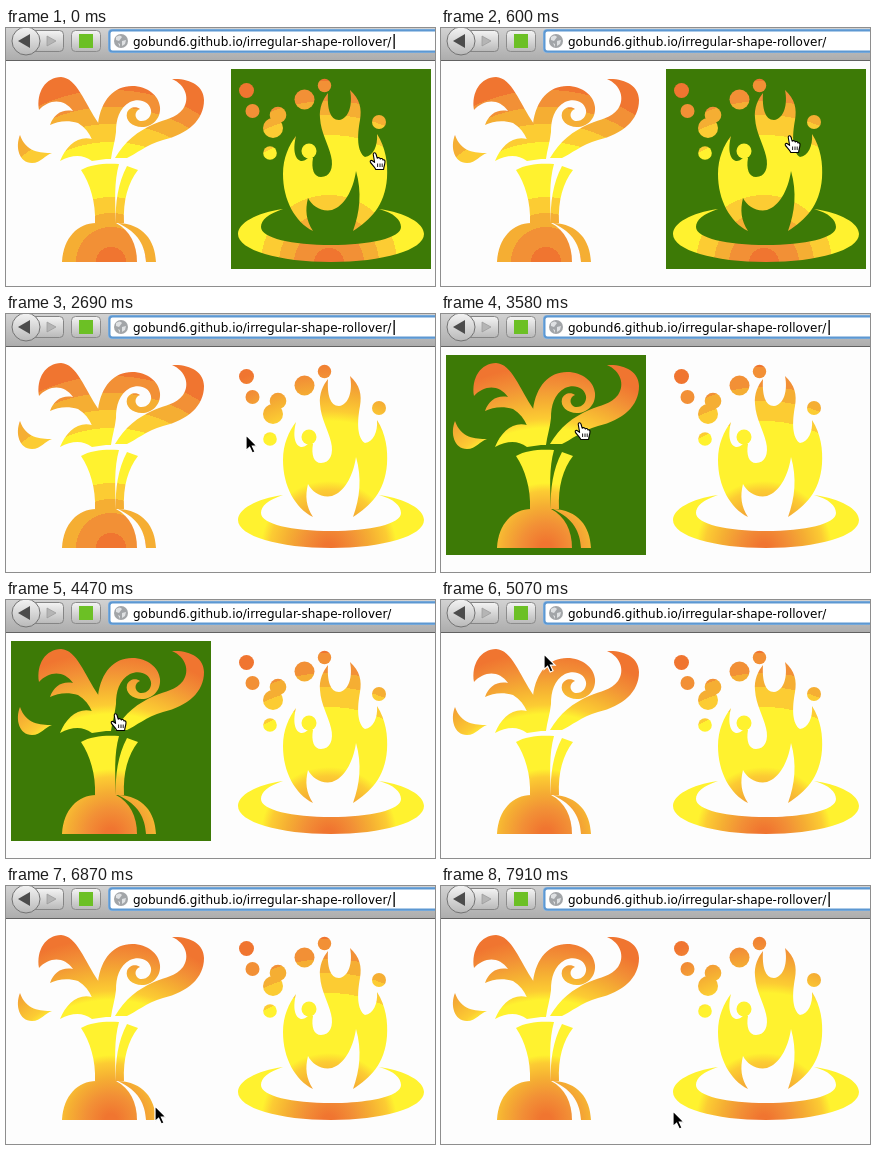
An HTML page for the animation above (8 s loop, 429x258 px).

```html
<!DOCTYPE html>
<html lang="en">
<head>
<meta charset="utf-8">
<title>Irregular shape rollover</title>
<style>
html, body { margin: 0; width: 100%; height: 100%; overflow: hidden; background: #fdfdfd; }
svg { display: block; width: 429px; height: 258px; }
text { font: 12px "DejaVu Sans", "Open Sans", sans-serif; }
</style>
</head>
<body>
<svg viewBox="0 0 429 258">
  <defs id="defs">
    <linearGradient id="bar" x2="0" y2="1"><stop stop-color="#d2d2d2"/><stop offset="1" stop-color="#adadad"/></linearGradient>
    <linearGradient id="button" x2="0" y2="1"><stop stop-color="#f4f4f4"/><stop offset="1" stop-color="#b9b9b9"/></linearGradient>
  </defs>

  <rect width="429" height="258" fill="#fdfdfd"/>
  <g id="toolbar">
    <rect width="429" height="32" fill="url(#bar)"/>
    <rect y="32" width="429" height="1" fill="#626262"/>
    <rect x="20.5" y="2.5" width="37" height="21" rx="4" fill="url(#button)" stroke="#858585"/>
    <path d="M41 8L50 13L41 18Z" fill="#b5b5b5" stroke="#999" stroke-width=".7"/>
    <circle cx="20" cy="13" r="14" fill="url(#button)" stroke="#737373"/>
    <path d="M12 13L24 6V20Z" fill="#4c4c4c"/>
    <rect x="65.5" y="2.5" width="29" height="21" rx="4" fill="url(#button)" stroke="#8c8c8c"/>
    <rect x="73" y="6" width="14" height="14" fill="#6cc025"/>
    <rect x="102" y="1" width="340" height="24" rx="4" fill="#8db9e4"/>
    <rect x="103.5" y="2.5" width="340" height="21" rx="3" fill="#fff" stroke="#5d98d2" stroke-width="2"/>
    <circle cx="115" cy="13" r="7" fill="#a2a5a8"/>
    <path d="M110 9q4-3 6 0l-3 4-3-1zM116 13l4-1-1 4-3 2zM112 15l2 1v3z" fill="#dfe1e3"/>
    <text x="127" y="18">gobund6.github.io/irregular-shape-rollover/</text>
    <rect id="caret" x="387.5" y="6" width="1.3" height="15"/>
  </g>

  <g id="fountain">
    <rect class="panel" x="5" y="41" width="200" height="200" fill="#3d7a06"/>
    <g class="shape">
      <path d="M14 107C9 119 13 135 26 135C35 135 39 127 46 125C34 125 20 124 14 107Z"/>
      <path d="M33 82C30 64 40 49 55 49C71 50 78 74 93 96C95 107 97 120 100 131H88C90 118 86 104 72 95C62 92 52 93 44 97C48 86 56 81 67 83C58 70 43 71 33 82Z"/>
      <path d="M54 133C60 118 72 107 86 111C94 116 98 125 100 131L86 133C76 126 66 127 54 133Z"/>
      <path d="M92 96C95 72 108 58 126 58C142 58 153 68 154 79C155 91 146 99 136 99C126 99 119 92 121 85C123 79 130 78 134 81C128 83 128 91 134 93C141 94 146 88 145 82C143 73 133 70 124 74C113 80 110 92 110 104C109 114 106 122 105 131H98C94 118 92 107 92 96Z"/>
      <path d="M166 51C184 50 198 58 198 72C198 92 182 106 157 112C140 117 130 126 121 130H109C119 113 132 103 148 96C160 91 170 90 177 81C184 71 180 57 166 51Z"/>
      <path d="M75 142C85 136 100 135 113 136C108 154 109 174 110 195H89C90 175 84 155 75 142Z"/>
      <path d="M121 138L132 142C122 155 117 172 118 195H110C109 175 112 155 121 138Z"/>
      <path d="M56 234C57 210 72 195 90 195H110C124 202 131 217 131 234Z"/>
      <path d="M112 195C137 196 149 212 150 234H140C139 218 133 205 112 195Z"/>
    </g>
  </g>

  <g id="fire">
    <rect class="panel" x="225" y="41" width="200" height="200" fill="#3d7a06"/>
    <g class="shape">
      <g id="sparks"></g>
      <path d="M290 108C286 124 290 133 296 133C299 133 302 130 304 128L307 130C305 141 308 149 315 149C324 149 328 140 325 128C322 115 315 105 314 90C313 80 317 71 322 65C321 80 324 92 333 92C343 91 347 76 344 62C354 71 356 81 354 92C351 108 351 124 359 129C367 128 372 118 371 106C380 120 382 136 381 150C379 178 364 192 347 203C354 184 356 164 350 143C347 163 338 178 326 182C315 184 306 178 302 170C299 182 300 192 307 203C289 194 277 172 277 146C277 130 283 117 290 108Z"/>
      <path d="M277 181C250 185 232 195 232 206C232 222 273 234 325 234C377 234 418 222 418 206C418 195 400 185 373 181C388 185 395 192 395 199C395 210 364 217 325 217C286 217 255 210 255 199C255 192 262 186 277 181Z"/>
    </g>
  </g>

  <path id="arrow" d="M-1-1V14.5L2.6 11.2L5.3 17L8 15.8L5.4 10.2H10Z" fill="#000" stroke="#fff" stroke-width="1.2"/>
  <g id="hand" stroke="#000" stroke-width="1.1" stroke-linejoin="round">
    <path d="M-1.8 1C-1.6-.6 .6-.6 1 1L2.2 5.2C3.4 4.2 5 4.6 5.2 6C6.4 5 7.6 5.6 8 7C9 6.4 10 7 10 8.6C10 11.5 9 12.5 8.6 16.5H.8C0 14-3 11.5-4.6 9.4C-5.4 7.6-3.6 6.8-2.2 8L-.4 9.4Z" fill="#fff"/>
    <path d="M2.6 10.5V14M5 10.5V14M7.2 10.5V14" fill="none" stroke-width=".9"/>
  </g>
</svg>

<script>
const LOOP = 8000;
const COLORS = ['#f07530', '#f29036', '#f5ae33', '#fccc33', '#fff22f'];
const $ = id => document.getElementById(id);

// Each spark: x, y, radius
const SPARKS = [[240.5, 62.5, 7.5], [246.5, 83, 7], [272, 87, 8.3], [267, 100, 10],
  [298.5, 71.5, 10], [318.5, 57.5, 6.7], [373, 94, 7], [264, 125, 6.8], [303, 123, 7.5]];
$('sparks').innerHTML = SPARKS.map(([x, y, r]) => `<circle cx="${x}" cy="${y}" r="${r}"/>`).join('');

// Bursts of repaints: first time, last time, count
const BURSTS = [[0, 0, 1], [150, 600, 4], [1200, 2240, 8], [2540, 2830, 3], [3130, 3730, 5],
  [4030, 5070, 8], [5220, 5220, 1], [5520, 6420, 7], [6570, 7610, 8], [7760, 7910, 2]];
const TICKS = BURSTS.flatMap(([from, to, n]) =>
  Array.from({ length: n }, (_, i) => Math.round(from + (to - from) * i / Math.max(1, n - 1))));

// Pointer: time, x, y, hovered shape
const POINTER = [
  [0, 369, 125, 'fire'], [600, 349, 108, 'fire'], [1050, 349, 108, 'fire'],
  [1640, 308, 122, 'fire'], [1790, 290, 129, 'fire'], [1935, 272, 128, ''],
  [2085, 256, 126, ''], [2235, 262, 123, 'fire'], [2535, 252, 124, ''], [2830, 230, 121, ''],
  [3130, 200, 117, ''], [3280, 176, 114, ''], [3430, 153, 110, 'fountain'],
  [3580, 139, 109, 'fountain'], [4030, 130, 111, 'fountain'], [4470, 100, 116, 'fountain'],
  [4765, 100, 78, ''], [5070, 104, 55, ''], [5220, 101, 52, ''], [5520, 99, 64, ''],
  [5820, 98, 110, 'fountain'], [6120, 100, 155, 'fountain'], [6420, 106, 205, 'fountain'],
  [6570, 118, 215, 'fountain'], [6715, 135, 219, ''], [6865, 150, 221, ''],
  [7610, 172, 227, ''], [7760, 200, 228, ''], [7910, 233, 226, '']];

// Rings run from orange to yellow and back; edges are radii in pixels.
function addGradient(id, cx, cy, edges, isSmooth) {
  const size = 220;
  const yellow = 4;
  const color = i => COLORS[i <= yellow ? i : 2 * yellow - i];
  const radii = [0, ...edges, size];
  let stops = '';
  const stop = (r, i) => stops += `<stop offset="${r / size}" stop-color="${color(i)}"/>`;
  for (let i = 0; i <= 2 * yellow; i++) {
    const [inner, outer] = [radii[i], radii[i + 1]];
    if (!isSmooth(inner) || i === yellow) {
      stop(inner, i);
      stop(outer, i);
    } else {
      stop(i === 0 ? 6 : i === 2 * yellow ? inner + 10 : (inner + outer) / 2, i);
    }
  }
  $('defs').insertAdjacentHTML('beforeend',
    `<radialGradient id="${id}" gradientUnits="userSpaceOnUse" cx="${cx}" cy="${cy}" r="${size}">${stops}</radialGradient>`);
}

const STYLES = { banded: () => false, smooth: () => true, mixed: r => r < 68 };
for (const [style, rule] of Object.entries(STYLES)) {
  addGradient('fountain-' + style, 105, 234, [15, 35, 49, 65, 120, 138, 155, 172], rule);
  addGradient('fire-' + style, 323, 235, [15, 35, 50, 68, 128, 148, 162, 182], rule);
}

function pointerAt(t) {
  let i = POINTER.length - 1;
  while (POINTER[i][0] > t) i--;
  const [t0, x0, y0, hover] = POINTER[i];
  const [t1, x1, y1] = POINTER[i + 1] || [LOOP, x0, y0];
  const k = (t - t0) / (t1 - t0);
  return { x: Math.round(x0 + (x1 - x0) * k), y: Math.round(y0 + (y1 - y0) * k), hover };
}

function fireStyle(t, hover) {
  if (t < 1900 || hover === 'fire') return 'banded';
  return t < 3130 || t > 7300 ? 'smooth' : 'mixed';
}

function paint(id, style, hover) {
  const group = $(id);
  group.querySelector('.panel').style.display = hover === id ? '' : 'none';
  group.querySelector('.shape').setAttribute('fill', `url(#${id}-${style})`);
}

function draw(t) {
  const { x, y, hover } = pointerAt(t);
  paint('fountain', t < 3130 ? 'banded' : 'smooth', hover);
  paint('fire', fireStyle(t, hover), hover);
  for (const id of ['arrow', 'hand']) {
    $(id).setAttribute('transform', `translate(${x} ${y})`);
    $(id).style.display = (id === 'hand') === Boolean(hover) ? '' : 'none';
  }
  const blink = (t / 1134 + 0.07) % 1;
  $('caret').style.display = blink < 0.5 ? '' : 'none';
}

const start = performance.now();
let shown = -1;
function frame() {
  const t = (performance.now() - start) % LOOP;
  const tick = TICKS.findLast(time => time <= t);
  if (tick !== shown) draw(shown = tick);
  requestAnimationFrame(frame);
}
frame();
</script>
</body>
</html>
```
